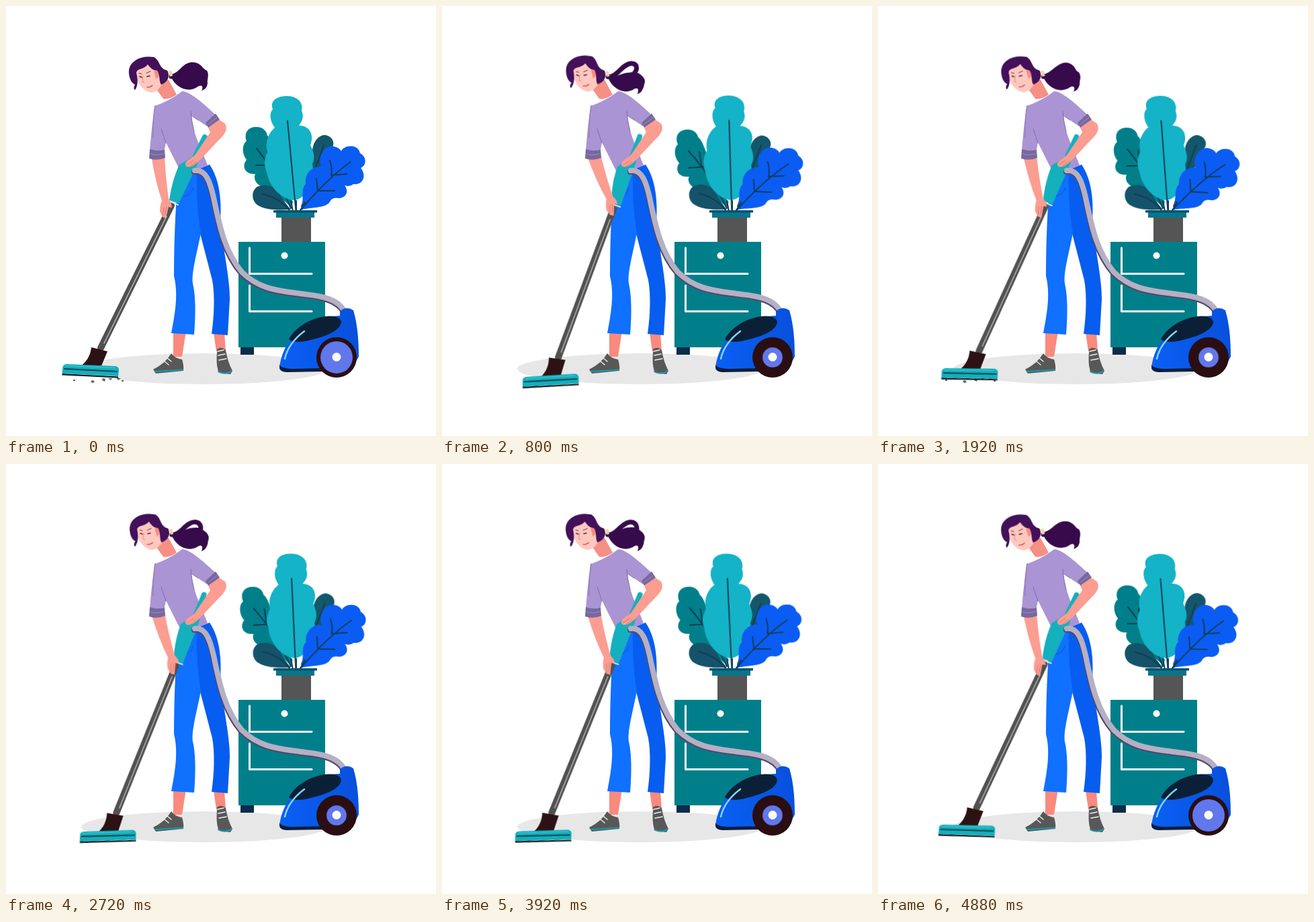
Recreate the animation shown at these times as an HTML page without scripts. Size 640 px wide and 640 px high, loop 4.96 s.

```html
<!DOCTYPE html>
<html lang="en">
<head>
<meta charset="utf-8">
<title>Vacuuming</title>
<style>
  html, body { margin: 0; width: 100%; height: 100%; overflow: hidden; background: #fff; }
  svg { display: block; width: 100vw; height: 100vh; }

  .sway, .nod, .curl, .hub, .dust { animation: 4960ms infinite; }
  .sway { animation-name: sway; }
  .nod { animation-name: nod; }
  .curl { animation-name: curl; d: var(--rest); }
  .hub { animation-name: hub; animation-timing-function: linear; transform-origin: 492px 523px; }
  .dust { animation-name: dust; animation-timing-function: step-end; }

  .wand { --turn: -6deg; transform-origin: 289px 209px; }
  .arm { --turn: -10.9deg; transform-origin: 226px 222px; }
  .head { --turn: 3.5deg; transform-origin: 240px 125px; }
  .tall { --turn: 3.7deg; transform-origin: 432px 300px; }
  .side { --turn: -4deg; transform-origin: 425px 302px; }
  .back { --turn: 1.2deg; transform-origin: 440px 300px; }
  .low { --turn: 1.5deg; transform-origin: 424px 302px; }
  .broad { --turn: 3deg; transform-origin: 437px 303px; }

  .mass {
    --rest: path("M243 103C256 103 260 87 274 84C290 82 291 93 299 96C303 103 299 109 300 115C299 122 296 124 291 126C294 121 292 117 287 119C270 132 252 119 247 108Z");
    --open: path("M243 103C256 108 264 98 276 97C288 94 292 97 297 101C304 108 300 111 300 116C298 123 296 126 291 128C293 122 292 118 287 120C270 133 252 119 247 108Z");
  }
  .strand {
    --rest: path("M246 105C258 104 265 91 276 89C285 88 292 94 296 103");
    --open: path("M246 105C260 105 265 85 279 83C288 82 290 91 284 98");
  }

  /* forward stroke takes ten ticks, backward stroke eleven */
  @keyframes sway {
    0%, 33.871%, 67.742% { transform: rotate(0deg); animation-timing-function: steps(10); }
    16.129%, 50% { transform: rotate(var(--turn)); animation-timing-function: steps(11); }
    83.871% { transform: rotate(var(--turn)); animation-timing-function: steps(10); }
    100% { transform: rotate(calc(var(--turn) * .0909)); }
  }
  @keyframes curl {
    0%, 33.871%, 67.742% { d: var(--rest); animation-timing-function: steps(10); }
    16.129%, 50% { d: var(--open); animation-timing-function: steps(11); }
    83.871% { d: var(--open); animation-timing-function: steps(10); }
    100% { d: var(--rest); }
  }
  @keyframes nod {
    0%, 25.806%, 51.613%, 77.419% { transform: rotate(0deg); animation-timing-function: steps(8); }
    12.903%, 38.71%, 64.516% { transform: rotate(var(--turn)); animation-timing-function: steps(8); }
    90.323% { transform: rotate(var(--turn)); animation-timing-function: steps(6); }
    100% { transform: rotate(calc(var(--turn) * .25)); }
  }
  @keyframes hub {
    0%, 32%, 34%, 64.5%, 68%, 98%, 100% { transform: scale(1); }
    4%, 29%, 38%, 62%, 71%, 95% { transform: scale(.62); }
  }
  @keyframes dust {
    0%, 30%, 62% { opacity: 1; }
    8%, 40%, 72%, 100% { opacity: 0; }
  }

  .line { fill: none; stroke-linecap: round; stroke-linejoin: round; }
  .vein { stroke: #113d56; stroke-width: 2; }
  .white { stroke: #fff; stroke-width: 3; }
  .skin { fill: #fb9d91; }
  .hair { fill: #43105a; }
  .tail { fill: #360a4b; }
  .shirt { fill: #aa94d3; }
  .cuff { fill: #77689f; }
  .shoe { fill: #585858; }
</style>
</head>
<body>
<svg viewBox="0 0 640 640">
  <defs>
    <linearGradient id="body" x1="0" x2="1">
      <stop offset="0" stop-color="#0a60f4"/>
      <stop offset="1" stop-color="#0850dc"/>
    </linearGradient>
  </defs>

  <ellipse cx="295" cy="540" rx="183" ry="23" fill="#e7e7e7"/>

  <g id="cabinet">
    <path d="M349 507h20v12h-20zM453 507h20v12h-20z" fill="#0b2c48"/>
    <path d="M346 351h129v157h-129z" fill="#007f8a"/>
    <path class="line white" d="M362.500 360V398.500H455M362.500 416V454.500H455"/>
    <circle cx="414.500" cy="371.500" r="5" fill="#fff"/>
  </g>

  <g id="plant">
    <g class="sway back">
      <path d="M440 300C446 270 450 245 457 226C453 208 462 193 474 192C487 193 491 206 484 213C489 223 480 236 470 241L450 285Z" fill="#14576a"/>
      <path class="line vein" d="M473 207L440 298"/>
    </g>
    <g class="sway side">
      <path d="M425 301C416 288 401 284 390 271C374 269 367 259 371 250C356 251 350 239 358 229C350 219 352 205 358 201C353 188 362 179 373 180C382 180 388 186 389 193C400 200 405 260 427 291Z" fill="#007f8b"/>
      <path class="line vein" d="M373 212Q402 248 424 301M389 214L391 236M372 237L393 237"/>
    </g>
    <g class="sway low">
      <path d="M424 303C405 304 386 304 374 296C364 288 366 274 374 269C386 264 400 267 408 280C412 289 418 296 424 303Z" fill="#15536a"/>
      <path class="line vein" d="M382 280Q408 286 422 304"/>
    </g>
    <g class="sway tall">
      <path d="M430 289C411 289 392 270 388 247C383 235 385 226 389 218C385 203 390 190 400 181C391 169 393 157 397 154C392 140 405 134 418 134C434 134 443 144 440 156C445 168 438 174 436 178C452 178 459 191 453 207C459 219 460 226 456 235C460 254 450 286 430 289Z" fill="#14b3c7"/>
      <path class="line vein" d="M419 171L431.500 305"/>
    </g>
    <g class="nod broad">
      <path d="M437 304C446 291 437 274 446 265C444 249 456 238 469 239C463 222 476 206 487 209C495 210 498 214 499 216C504 206 524 205 527 219C538 225 536 238 528 241C538 254 530 267 517 265C512 269 506 268 504 267C512 278 504 286 495 286C487 285 484 287 481 293C472 302 451 299 437 304Z" fill="#0a5cf3"/>
      <path class="line vein" d="M513 232Q481 254 438 304M482 230Q486 242 484 252L507 250M462 257L464 275L489 275"/>
    </g>
    <path class="line vein" d="M424 290L428 311M432 290V311M445 292L435 311"/>
    <path d="M410 313h44v38h-44z" fill="#555"/>
    <path d="M402 307h57v8h-57z" fill="#08758a"/>
    <path d="M398 304h65v3.500h-65z" fill="#07546b"/>
  </g>

  <g class="dust" fill="#67605d">
    <path d="M126 558l4-1 2 3-4 1zM144 554l4 1-1 4-4-2zM152 554h6l-2 3zM164 553l7 1-4 3zM100 556h3v2h-3zM172 557h3v2h-3z"/>
  </g>

  <g id="legs">
    <path d="M249 484h19l-6 38h-13zM309 486h16l2 28h-14z" fill="#f98a7d"/>
    <path class="shoe" d="M219 541Q237 532 246 517Q252 525 262 526Q265 535 264 543L223 547Z"/>
    <path class="shoe" d="M314 511Q320 506 327 512Q330 530 337 543L334 548L317 546C312 534 314 522 314 511Z"/>
    <path class="line" d="M222 544L263 541.500M316 544Q326 550 336 543" stroke="#159cae" stroke-width="2"/>
    <path class="line" d="M236 529l6 5M240 524l6 5M315 514l9-2M316 520l10-2M317 527l11-2" stroke="#eee" stroke-width="1.500"/>
    <path d="M275 247L303 236C319 260 321 292 319 323C323 360 334 410 333 437L330 490L306 488C310 460 311 430 307 408L288 335Z" fill="#075df0"/>
    <path d="M256 256L284 240Q283 300 290 338C283 373 276 397 278 413Q284 438 280 489L246 487C253 452 256 426 250 402C250 350 252 305 256 256Z" fill="#1070ff"/>
    <path class="line" d="M264 284Q276 281 279 270" stroke="#0a56d8"/>
  </g>

  <path d="M224 124L230 110L242 110L254 132Q242 140 234 138Z" fill="#f68f84"/>

  <path class="shirt" d="M221 149Q244 141 262 127Q273 125 312 162L299 179L276 163C279 194 292 214 300 237L280 246L260 247L238 203L235 219L214 217C216 188 219 165 221 149Z"/>
  <path class="line" d="M231 183L238 204M276 163L286 170M275 157Q276 171 280 187" stroke="#806fae"/>
  <path class="line" d="M222 148Q218 176 219 196" stroke="#8b78b7"/>

  <g class="sway wand">
    <path class="line" d="M246 297L141 509" stroke="#515151" stroke-width="10"/>
    <path class="line" d="M239 313L146 502" stroke="#b6b6b6" stroke-width="1.500"/>
    <path d="M127 508L151 514L141 538L111 536Q125 526 127 508Z" fill="#2c1215"/>
    <path d="M83.500 547L167 551.500V553.500L83.500 549.500Z" fill="#101a20"/>
    <path d="M84.500 537Q85.500 533 91 533L163 536Q168 537 168 542L167 551L83.500 547Z" fill="#14aebc"/>
    <path class="line" d="M87 540L165 544" stroke="#0a4450" stroke-width="2"/>
    <path class="line" d="M89 535.500L162 538.500" stroke="#45ccd5"/>
    <path d="M293 192Q297 189 300 194L284 238L257 294L243 289C246 268 251 251 258 236Q268 231 277 224Z" fill="#14b0bd"/>
    <path class="line" d="M245 291L256 296" stroke="#dce3e5" stroke-width="2"/>
  </g>

  <g class="line">
    <path d="M280 247C297 245 303 264 308 286C317 330 324 368 350 398C378 426 411 426 444 431C475 434 493 440 502 455" stroke="#55486b" stroke-width="8"/>
    <path d="M281 245C298 243 304 263 309 285C318 329 326 366 351 396C379 424 412 424 445 429C476 432 494 438 503 453" stroke="#b5b0c4" stroke-width="8"/>
  </g>

  <g id="vacuum">
    <path d="M407 539C409 517 421 494 439 478C455 465 478 462 497 461V454Q507 446 517 453C524 476 525 502 525 522Q515 545 470 543L418 544Q407 544 407 539Z" fill="url(#body)"/>
    <path d="M407 534Q410 540 430 540L472 539V544L418 545Q406 545 407 534Z" fill="#0b1d3a"/>
    <path d="M421 496C430 479 450 466 474 462C490 460 499 464 499 471C496 486 470 493 450 498C438 501 424 500 421 496Z" fill="#0b2037"/>
    <path class="line" d="M415 525Q420 502 444 484" stroke="#83d5f3" stroke-width="2.500"/>
    <circle cx="492" cy="523" r="30" fill="#2a0e12"/>
    <circle class="hub" cx="492" cy="523" r="24" fill="#6178ec"/>
    <circle cx="492" cy="522.500" r="6.500" fill="#fff"/>
  </g>

  <g class="sway arm">
    <path class="skin" d="M216 222L236 220Q237 250 242 287L246 294L247 300L242 299L238 316L233 314L229 306Q229 296 232 290Q222 260 216 222Z"/>
    <path class="line" d="M235 300L233 312M239 299L237 311" stroke="#df776f"/>
  </g>
  <path class="cuff" d="M214 213Q225 217 236 214L237 226Q224 231 213 227Z"/>
  <path class="line" d="M215 220Q224 223 234 220" stroke="#9d8bc2"/>

  <path class="skin" d="M301 181L317 169L326 175Q331 183 323 193L288 230Q276 242 269 239Q264 236 270 230L281 222L304 188Z"/>
  <path class="line" d="M270 236l9-6M274 239l9-7" stroke="#df776f"/>
  <path class="cuff" d="M312 160L318 169L301 181L297 174Z"/>
  <path class="line" d="M301 176L314 166" stroke="#9d8bc2"/>

  <g class="sway head">
    <path class="curl mass tail"/>
    <path class="curl strand line" stroke="#360a4b" stroke-width="7"/>
    <path d="M194 95L196 112Q204 128 218 129Q229 126 233 113L227 86L206 82Z" fill="#ffc8bf"/>
    <path d="M220 97Q228 92 229 103L224 109Z" fill="#f78d82"/>
    <path class="hair" d="M183 101C181 82 201 73 220 76C230 81 227 93 240 96C245 105 240 114 231 117C227 111 230 103 225 96C218 96 214 91 211 87C205 95 196 92 194 99C197 112 196 119 192 125C189 123 191 119 192 117C186 114 184 108 183 101Z"/>
    <path class="line" d="M198 100l4 1M209 100l6-3" stroke="#693245"/>
    <path class="line" d="M199 105l3 1M210 105l4-1" stroke="#40203c" stroke-width="1.500"/>
    <path class="line" d="M204 104L203 113L206 114" stroke="#e98680"/>
    <path class="line" d="M210 121Q215 121 218 118" stroke="#d94e58" stroke-width="1.500"/>
    <path d="M242 97q4-2 5 1l1 6-4 1z" fill="#f1d5a5"/>
  </g>
</svg>
</body>
</html>
```
